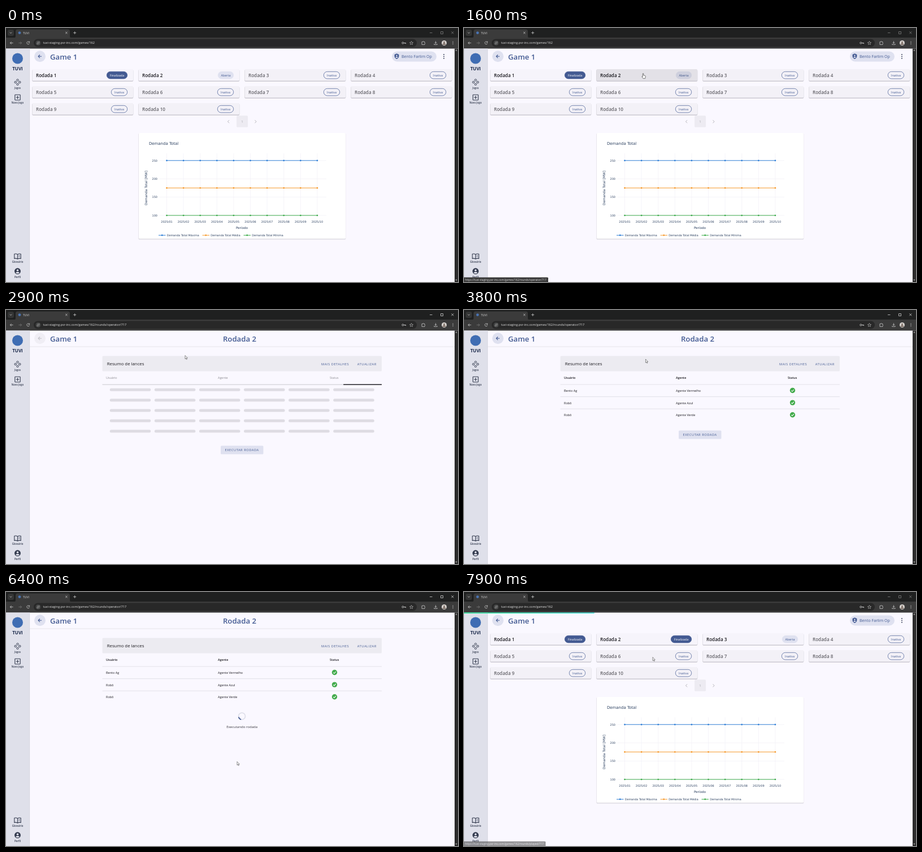
Animation, 800 px wide and 450 px high, one loop 8000 ms. Source, as an HTML page:

```html
<!DOCTYPE html>
<html lang="pt">
<head>
<meta charset="utf-8">
<title>Game 1</title>
<style>
  html, body { margin: 0; width: 100%; height: 100%; overflow: hidden; background: #faf8ff; }
  svg { display: block; width: 800px; height: 450px; }
  text { font-family: "Open Sans", "Noto Sans", sans-serif; white-space: pre; }
  .chart text { font-family: "DejaVu Sans", Verdana, sans-serif; }
</style>
</head>
<body>
<svg id="stage" viewBox="0 0 800 450"></svg>
<script>
const LOOP = 8000, BLUE = '#435a92', SOFT = '#dfe1f0', INK = '#1c1b20';
const OPENED = 2030, LOADED = 3300, RUNNING = 5300, RETURNED = 6600;
const CLICKS = [1700, 7040];
const HOST = 'tuvi-staging.psr-inc.com/games/162';

const rect = (x, y, w, h, fill, r = 0, more = '') =>
  `<rect x="${x}" y="${y}" width="${w}" height="${h}" rx="${r}" fill="${fill}" ${more}/>`;
const circle = (x, y, r, fill, more = '') =>
  `<circle cx="${x}" cy="${y}" r="${r}" fill="${fill}" ${more}/>`;
const line = (d, color, width = 1, more = '') =>
  `<path d="${d}" fill="none" stroke="${color}" stroke-width="${width}" ${more}/>`;
const text = (x, y, size, str, fill = INK, weight = 400, anchor = 'start', more = '') =>
  `<text x="${x}" y="${y}" font-size="${size}" fill="${fill}" font-weight="${weight}" text-anchor="${anchor}" ${more}>${str}</text>`;
const group = (id, body, more = '') => `<g id="${id}" ${more}>${body}</g>`;
const range = n => [...Array(n).keys()];

function browser() {
  const icon = '#c9c9c9';
  return rect(0, 0, 800, 18, '#1f2020') +
    rect(3, 3, 11, 11, '#343535', 3) + line('M6.7 7.6l1.8 1.8 1.8-1.8', icon, .8) +
    line('M14 17.5Q17 17.5 17 14V6Q17 2.5 20.5 2.5H109.5Q113 2.5 113 6V14Q113 17.5 116 17.5Z', 'none').replace('fill="none"', 'fill="#3b3b3b"') +
    circle(24, 8.6, 2.4, '#4a74b4') +
    text(30, 10.5, 5, 'TUVI', '#dedede') +
    line('M105.2 6.8l3.4 3.4m0-3.4l-3.4 3.4', '#dedede', .7) +
    line('M119.2 8.5h5m-2.5-2.5v5', icon, .8) +
    group('controls', line('M750 8.5h4.5M769.5 6.5h4v4h-4zM788.3 6.3l4 4m0-4l-4 4', 'currentColor', .7)) +
    rect(0, 17, 800, 19.5, '#3b3b3b') + rect(49, 19.5, 678, 14, '#282828', 7) +
    line('M12.6 26.5H7.4m2.3-2.4l-2.4 2.4 2.4 2.4', icon, .8) +
    line('M22.4 26.5h5.2m-2.3-2.4l2.4 2.4-2.4 2.4', '#777', .8) +
    line('M41.2 25A2.4 2.4 0 1 0 41.5 27.2M41.6 23.6v1.9h-1.9', icon, .8) +
    circle(57, 26.5, 4.7, '#3f4040') +
    line('M54.8 25.2h2.6M56.6 27.9h2.6', icon, .7) +
    circle(58.5, 25.2, .7, 'none', `stroke="${icon}" stroke-width=".6"`) +
    circle(55.4, 27.9, .7, 'none', `stroke="${icon}" stroke-width=".6"`) +
    text(65.5, 28.4, 5.5, '', '#e4e4e4', 400, 'start', 'id="address"') +
    circle(702.3, 26.5, 1.5, 'none', `stroke="${icon}" stroke-width=".9"`) + line('M703.8 26.5h3.8v1.4m-1.5-1.4v1.2', icon, .9) +
    line('M717.5 23.4l.9 2.1 2.2.2-1.7 1.5.5 2.2-1.9-1.2-1.9 1.2.5-2.2-1.7-1.5 2.2-.2z', icon, .6) +
    line('M736 24.5h1.6a.9.9 0 0 1 1.8 0h1.6v1.7a.9.9 0 0 1 0 1.7v1.5h-5z', icon, .8) +
    line('M760.5 23.3v4m-1.8-1.7l1.8 1.8 1.8-1.8M757.8 28v1.4h5.4V28', icon, .8) +
    circle(775.5, 26.5, 4.5, '#d8d4d0') + circle(775.5, 25.2, 1.5, '#77685f') +
    '<path d="M772.6 29.7a2.9 2.7 0 0 1 5.8 0z" fill="#77685f"/>' +
    [24.2, 26.5, 28.8].map(y => circle(791, y, .65, icon)).join('') +
    rect(794, 36.5, 6, 414, '#2b2b2b') +
    '<path d="M795.2 40.5h3.4l-1.7-2.6zM795.2 445.5h3.4l-1.7 2.6z" fill="#a0a0a0"/>';
}

function account(x, y, r, color, hole) {
  return circle(x, y, r, color) + circle(x, y - r * .3, r * .32, hole) +
    `<ellipse cx="${x}" cy="${y + r * .48}" rx="${r * .55}" ry="${r * .28}" fill="${hole}"/>`;
}

function sidebar() {
  const dark = '#343b4f';
  const label = (y, str) => text(20.5, y, 4.4, str, dark, 600, 'middle');
  const pads = [[20.5, 92.3], [20.5, 99.7], [16.7, 96], [24.3, 96]]
    .map(([x, y]) => circle(x, y, 1.7, 'none', `stroke="${dark}" stroke-width="1"`)).join('');
  return rect(0, 36.5, 42, 414, '#dfe0ea') + line('M41.7 36.5V450', '#d0d1da', .6) +
    circle(20.5, 54, 9.5, '#3f6db3') + text(20.5, 75, 8, 'TUVI', '#1c2a4c', 700, 'middle') +
    pads + label(108.3, 'Jogos') +
    rect(15.8, 118.3, 9.4, 9.4, 'none', .6, `stroke="${dark}" stroke-width="1.1"`) + line('M20.5 120.3v5.4m-2.7-2.7h5.4', dark, 1.1) +
    label(134.3, 'Novo Jogo') +
    line('M20.5 401.2Q17.5 399.4 14.8 400.4V408.4Q17.5 407.6 20.5 409.2Q23.5 407.6 26.2 408.4V400.4Q23.5 399.4 20.5 401.2V409', dark, 1.1) +
    line('M22 403.2l2.8-.5M22 405.2l2.8-.5', dark, .6) + label(416.3, 'Glossário') +
    account(20.5, 430.8, 5.5, dark, '#dfe0ea') + label(443.3, 'Perfil');
}

function chip(right, y, kind) {
  const [w, fill, color, stroke] = {
    Finalizada: [37, BLUE, '#fff', BLUE],
    Aberta: [28, SOFT, BLUE, SOFT],
    Inativa: [29, 'none', BLUE, BLUE]
  }[kind];
  return rect(right - w + .3, y + 4.3, w - .6, 12.6, fill, 6.3, `stroke="${stroke}" stroke-width=".7"`) +
    text(right - w / 2, y + 12.6, 5.5, kind, color, 400, 'middle');
}

function card(i, kind) {
  const x = 46.5 + i % 4 * 188, y = 73 + Math.floor(i / 4) * 30, off = kind === 'Inativa';
  return rect(x - .3, y + .8, 179.1, 20.9, '#c3c1c9', 2) + rect(x, y, 178.5, 20.6, off ? '#f3f1f7' : '#f6f4fb', 1.5) +
    text(x + 6.5, y + 13.8, 8.1, `Rodada ${i + 1}`, off ? '#66656b' : INK, 600) + chip(x + 168.5, y, kind);
}

function chart() {
  const px = i => 284.5 + i * 29.6, py = v => 332 - (v - 100) * .648;
  const ink = '#2a3f5f', grid = '#eeedf5';
  const series = [['Máxima', 250, '#2f7fd6', 270], ['Média', 175, '#f79a2d', 347.5], ['Mínima', 100, '#3bab48', 420.5]];
  const vertical = range(10).map(i => line(`M${px(i)} 222V345`.replace('345', '335'), grid, .6) +
    text(px(i), 344.8, 4.95, `2025/${String(i + 1).padStart(2, '0')}`, ink, 400, 'middle')).join('');
  const horizontal = [100, 150, 200, 250].map(v => line(`M272 ${py(v)}H567`, grid, .6) +
    text(268, py(v) + 1.8, 4.95, v, ink, 400, 'end')).join('');
  const plots = series.map(([name, v, color, lx]) =>
    line(`M${px(0)} ${py(v)}H${px(9)}`, color, 1) + range(10).map(i => circle(px(i), py(v), 1.35, color)).join('') +
    line(`M${lx} 367.2h12.5`, color, 1) + circle(lx + 6.2, 367.2, 1.35, color) +
    text(lx + 14.7, 369, 4.85, `Demanda Total ${name}`, ink)).join('');
  return '<g class="chart">' + rect(234.6, 186.6, 366.6, 188, '#cdcbd3', 1.5) + rect(235, 186, 366, 187.6, '#fff', 1.5) +
    text(253, 206.6, 6.95, 'Demanda Total', ink) + vertical + horizontal + plots +
    text(417.5, 356, 5.7, 'Período', ink, 400, 'middle') +
    text(0, 0, 5.83, 'Demanda Total [MW]', ink, 400, 'middle', 'transform="translate(250.2 283.5) rotate(-90)"') + '</g>';
}

function gamePage() {
  const arrows = line('M395 163.2l-2.5 2.6 2.5 2.6M440.5 163.2l2.5 2.6-2.5 2.6', '#a3a2a9', .8);
  return rect(683, 41.5, 79, 18, SOFT, 9) +
    '<path d="M691.5 45.3l3.9 1.6v2.9q0 3.6-3.9 5.1q-3.9-1.5-3.9-5.1v-2.9z" fill="#435a92"/>' +
    circle(691.5, 48.7, 1.2, SOFT) + '<ellipse cx="691.5" cy="51.9" rx="2" ry="1.1" fill="#dfe1f0"/>' +
    text(700, 53.1, 7.1, 'Bento Farlim Op', BLUE) +
    [47, 50.4, 53.8].map(y => circle(775, y, .95, '#303852')).join('') +
    range(10).map(i => i === 1 || i === 2 ? '' : card(i, i ? 'Inativa' : 'Finalizada')).join('') +
    group('before', card(1, 'Aberta') + card(2, 'Inativa')) +
    group('after', card(1, 'Finalizada') + card(2, 'Aberta')) +
    rect(234.5, 73, 178.5, 20.6, '#000', 1.5, 'id="hover"') +
    circle(0, 0, 0, '#000', 'id="ripple" clip-path="url(#cardClip)"') +
    rect(408, 155.3, 20, 20.4, '#edebf2', 1.5) + text(418, 168.1, 6, '1', '#a3a2a9', 400, 'middle') + arrows + chart();
}

function roundPage() {
  const upper = 'letter-spacing=".52"';
  const headers = color => [[177, 'Usuário'], [375, 'Agente'], [573, 'Status']]
    .map(([x, s]) => text(x, 122, 5.4, s, color, color === INK ? 600 : 400)).join('');
  const bones = range(30).map(i =>
    rect(183.7 + i % 6 * 79.1, 138.8 + Math.floor(i / 6) * 18.35, 72.6, 5, '#dedce3', 2.5)).join('');
  const rows = [['Bento Ag', 'Vermelho'], ['Robô', 'Azul'], ['Robô', 'Verde']].map(([user, agent], i) => {
    const y = 142.5 + i * 21.6;
    return text(177, y + 2.4, 5.5, user) + text(375, y + 2.4, 5.5, `Agente ${agent}`) +
      circle(581.5, y, 4.7, '#43ab4c') + line(`M579.3 ${y + .2}l1.6 1.6 3-3.3`, '#fff', 1.1) +
      line(`M170.5 ${y - 10.5}H665`, '#d9d7de', .7);
  }).join('');
  return line('M42 65H794', '#e2e0e8', .9) + text(413.5, 56, 13.2, 'Rodada 2', BLUE, 600, 'middle') +
    rect(170.5, 81.5, 494.5, 27, '#ecebf1', 1.5) + text(178.7, 98.4, 7.8, 'Resumo de lances') +
    text(558, 97.7, 5.75, 'MAIS DETALHES', BLUE, 500, 'start', upper) +
    text(621.8, 97.7, 5.75, 'ATUALIZAR', BLUE, 500, 'start', upper) +
    group('loading', headers('#8c8b91') + bones + rect(170.5, 131.6, 494.5, 1, '#c9c8ce') +
      rect(0, 131.4, 0, 1.4, '#1c1b20', 0, 'id="bar"')) +
    group('table', headers(INK) + rows) +
    group('run', rect(380, 240.5, 75.5, 15, SOFT, 1.5) +
      text(387.5, 250.1, 5.75, 'EXECUTAR RODADA', BLUE, 500, 'start', upper)) +
    group('busy', circle(417.5, 220, 6, 'none', 'stroke="#dcdde8" stroke-width="1.6"') +
      circle(417.5, 220, 6, 'none', `id="spinner" stroke="${BLUE}" stroke-width="1.7"`) +
      text(417.7, 241, 6.1, 'Executando rodada', '#39383e', 400, 'middle'));
}

const stage = document.getElementById('stage');
stage.innerHTML = `<defs>
  <clipPath id="cardClip">${rect(234.5, 73, 178.5, 20.6, '#000', 1.5)}</clipPath>
  <linearGradient id="glow" gradientUnits="userSpaceOnUse" x1="0" x2="794">
    <stop stop-color="#00dc82"/><stop offset=".5" stop-color="#34cdfe"/><stop offset="1" stop-color="#0047e1"/>
  </linearGradient></defs>` +
  rect(0, 0, 800, 450, '#faf8ff') + browser() + sidebar() +
  group('back', circle(60, 50.3, 10, 'currentColor') + line('M63 50.3H57.2m2.7-2.8l-2.8 2.8 2.8 2.8', BLUE, 1.1, 'id="backArrow"')) +
  text(78, 56, 13.2, 'Game 1', BLUE, 600) +
  group('game', gamePage()) + group('round', roundPage()) +
  rect(0, 36.5, 0, 1.4, 'url(#glow)', 0, 'id="progress"') +
  group('status', rect(-2, 441.7, 0, 10, '#3b3b3b', 1.5, 'id="statusBox"') + text(2, 447.8, 4.75, '', '#dcdcdc', 400, 'start', 'id="link"')) +
  group('cursor',
    '<path id="arrow" d="M0 0V6.2L1.4 4.9 2.4 7.1 3.4 6.6 2.4 4.5H4.3Z" fill="#fff" stroke="#333" stroke-width=".55"/>' +
    '<path id="hand" d="M-.7 .7a.75 .75 0 0 1 1.5 0V3.3L3.6 4Q4.5 4.3 4.3 5.2L3.6 8.9H.2L-2.1 6Q-2.1 5-1.3 5.2L-.7 5.8Z" fill="#fff" stroke="#222" stroke-width=".6"/>');

const el = {};
stage.querySelectorAll('[id]').forEach(node => el[node.id] = node);
const set = (id, attrs) => { for (const k in attrs) el[id].setAttribute(k, attrs[k]); };
const show = (id, on) => { el[id].style.display = on ? '' : 'none'; };
const write = (id, str) => { if (el[id].textContent !== str) el[id].textContent = str; };
const clamp = u => Math.max(0, Math.min(1, u));
const within = (t, a, b) => t >= a && t < b;
const fade = (t, a, b, d) => clamp((t - a) / d) * clamp(1 - (t - b) / d);
const smooth = u => u * u * (3 - 2 * u);

// time, x, y of the pointer tip
const PATH = [[300, 560, 300], [1350, 317, 80.5], [3700, 317, 80.5], [4500, 418, 232], [4850, 418, 232], [5080, 418, 221],
  [5450, 418, 221], [6200, 409, 300.5], [6500, 409, 300.5], [6900, 358, 79.7], [7250, 358, 79.7], [7800, 334, 115.5]];

function pointer(t) {
  const i = PATH.findIndex(p => p[0] > t);
  if (i < 1) return (i ? PATH[PATH.length - 1] : PATH[0]).slice(1);
  const [a, b] = [PATH[i - 1], PATH[i]], u = smooth((t - a[0]) / (b[0] - a[0]));
  return [a[1] + (b[1] - a[1]) * u, a[2] + (b[2] - a[2]) * u];
}

function draw(t) {
  const inRound = within(t, OPENED, RETURNED), ready = t >= LOADED, busy = t >= RUNNING;
  show('game', !inRound);
  show('round', inRound);
  show('before', t < OPENED);
  show('after', t >= RETURNED);
  write('address', HOST + (inRound ? '/rounds/operator/717' : ''));
  el.controls.style.color = inRound ? '#ececec' : '#8d8d8d';

  const locked = inRound && !ready;
  el.back.style.color = locked ? '#f0eef5' : SOFT;
  set('backArrow', { stroke: locked ? '#c2c1c9' : BLUE });

  show('loading', !ready);
  show('table', ready);
  show('run', !busy);
  show('busy', busy);
  set('run', { transform: `translate(0 ${ready ? -27 : 0})` });

  const sweep = 1 - (1 - clamp((t - OPENED) / 1320)) ** 2.5;
  const from = clamp(-2 + 3.07 * sweep), to = clamp(1.08 * sweep);
  set('bar', { x: 170.5 + 494.5 * from, width: 494.5 * Math.max(0, to - from) });

  const spin = (t - RUNNING) / 1400, arc = 16 + 10 * Math.sin(spin * 2 * Math.PI);
  set('spinner', { 'stroke-dasharray': `${arc} 60`, transform: `rotate(${spin * 360 + 180} 417.5 220)` });

  // the ripple slides from the click point to the middle of the card
  const click = t < OPENED ? CLICKS[0] : CLICKS[1], age = t - click;
  const grow = 1 - (1 - clamp(age / 300)) ** 3, startX = pointer(click)[0];
  set('ripple', {
    cx: startX + (323.7 - startX) * grow, cy: 83.3, r: 90 * (.3 + .7 * grow),
    opacity: age < 0 ? 0 : .26 * clamp(1 - (age - 300) / 300)
  });
  set('hover', { opacity: .08 * Math.max(fade(t, 1250, OPENED, 200), fade(t, 6850, 7400, 200)) });

  const elapsed = Math.max(0, t - 7410);
  set('progress', { width: 794 * 2 / Math.PI * Math.atan(elapsed / 1000) });

  const first = t < 4000;
  write('link', `https://${HOST}/rounds/${first ? 'operator' : 'played'}/717`);
  set('statusBox', { width: first ? 151 : 146.5 });
  set('status', { opacity: first ? fade(t, 1350, OPENED, 150) : fade(t, 6880, 7830, 150) });

  const [x, y] = pointer(t);
  const overLink = within(t, 1300, OPENED) || within(t, 5000, RUNNING) || within(t, 6860, 7400);
  set('cursor', { transform: `translate(${x} ${y})` });
  show('cursor', t >= 300);
  show('hand', overLink);
  show('arrow', !overLink);
}

const begin = performance.now();
function tick() {
  draw((performance.now() - begin) % LOOP);
  requestAnimationFrame(tick);
}
tick();
</script>
</body>
</html>
```
